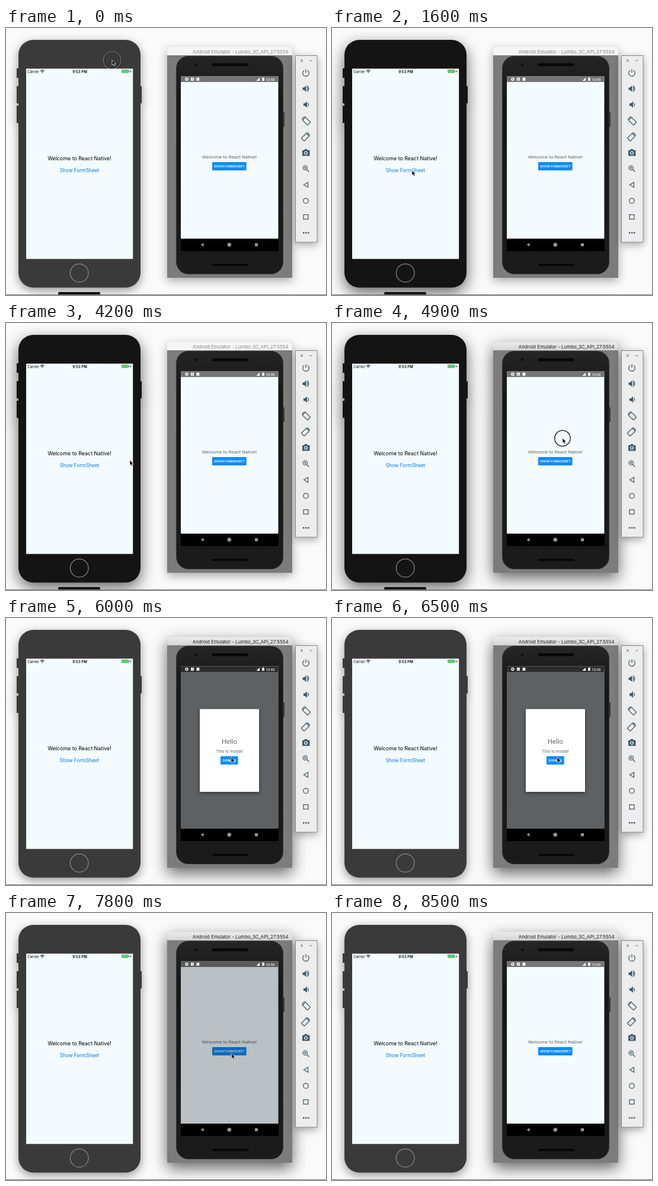
An HTML page for the animation above (8600 ms loop, 540 px wide and 450 px high).

```html
<!DOCTYPE html>
<html lang="en">
<head>
<meta charset="utf-8">
<title>Form sheet demo</title>
<style>
  html, body { margin: 0; width: 100%; height: 100%; overflow: hidden; background: #fafafa; }
  svg { display: block; width: 100%; height: 100%; }
  .ios { font-family: Inter, sans-serif; text-anchor: middle; }
  .link { font-size: 8.25px; fill: #0878e8; }
  .droid { font-family: Roboto, sans-serif; text-anchor: middle; fill: #666; }
  .cap { font-size: 5.8px; font-weight: 500; fill: #fff; }
  .button { fill: #0b8cf8; filter: drop-shadow(0 .8px .7px #0004); }
  #phone { fill: #3a3a3a; filter: drop-shadow(0 5px 8px #0006); }
  #phone.active { fill: #141414; filter: drop-shadow(0 9px 13px #0009); }
  #window { filter: drop-shadow(0 5px 8px #0005); }
  #window.active { filter: drop-shadow(0 9px 13px #0009); }
  #titleBar { fill: #f5f5f5; }
  #title { fill: #888; font: 7.9px Inter, sans-serif; text-anchor: end; }
  .active #titleBar { fill: url(#chrome); }
  .active #title { fill: #222; }
  .tools { fill: none; stroke: #3d5b6d; stroke-width: 1.25; }
  .tools .solid { fill: #3d5b6d; stroke: none; }
</style>
</head>
<body>
<svg viewBox="0 0 540 450">
  <defs>
    <clipPath id="iosScreen"><path d="M34 68.500H214.200V389.200H34z"/></clipPath>
    <linearGradient id="shell" x2="0" y2="1">
      <stop stop-color="#252525"/><stop offset=".2" stop-color="#171717"/><stop offset="1" stop-color="#1b1b1b"/>
    </linearGradient>
    <linearGradient id="chrome" x2="0" y2="1">
      <stop stop-color="#ebebeb"/><stop offset="1" stop-color="#d5d5d5"/>
    </linearGradient>
  </defs>
  <rect width="540" height="450" fill="#fafafa"/>

  <g id="phone">
    <rect x="21" y="20" width="206" height="417.500" rx="25"/>
    <path d="M18 68h4v16h-4zM18 98h4v29h-4zM18 131h4v29h-4zM226 98h3v29h-3z"/>
  </g>
  <circle cx="123.700" cy="413" r="15.300" fill="none" stroke="#8b8b8b" stroke-width="1.200"/>
  <g clip-path="url(#iosScreen)" class="ios">
    <rect x="34" y="68" width="181" height="322" fill="#f3fbff"/>
    <text x="124" y="223" font-size="8.900">Welcome to React Native!</text>
    <text x="124" y="243" class="link" id="iosOpen">Show FormSheet</text>
    <rect id="iosVeil" x="34" y="68" width="181" height="322" fill="#fff"/>
    <g id="iosSheet">
      <rect x="57" y="136.500" width="135" height="184.500" rx="3" fill="#fff" style="filter:drop-shadow(0 0 2px #0003)"/>
      <text x="124" y="214.500" font-size="12.400">Hello</text>
      <text x="124" y="231" font-size="8.300">This is modal!</text>
      <text x="124" y="250" class="link" id="iosDismiss">Dismiss</text>
    </g>
    <text x="46" y="75.500" font-size="5.950">Carrier</text>
    <text x="124.500" y="75.500" font-size="6.100" font-weight="600">9:53 PM</text>
    <path d="M58 72.300Q61.300 69.200 64.600 72.300M59.300 73.700Q61.300 71.800 63.300 73.700M60.600 75.100h1.400" fill="none" stroke="#111" stroke-width="1.100"/>
    <rect x="195.300" y="70.500" width="11.500" height="5" rx="1" fill="#4bd763" stroke="#777" stroke-width=".5"/>
    <path d="M207.400 72h.8v2h-.8zM211 70.500l-1.700 3h1.200l-.4 2.300 1.700-3h-1.200z" fill="#222"/>
  </g>
  <rect id="dock" x="88" y="445" width="71" height="9" rx="2" fill="#111"/>
  <path d="M0 449.500H540" stroke="#777"/>

  <g id="window">
    <path d="M272 421V36q0-4 4-4H479q4 0 4 4V421z" fill="#7c7c7c"/>
    <path id="titleBar" d="M272 46V36q0-4 4-4H479q4 0 4 4V46z"/>
    <text id="title" x="476.500" y="42.500">Android Emulator - Lumbo_3C_API_27:5554</text>
  </g>
  <rect x="468" y="142" width="2" height="25" rx="1" fill="#3a3a3a"/>
  <rect x="287.500" y="47.500" width="180" height="367" rx="20" fill="url(#shell)" stroke="#333"/>
  <g fill="#080808" stroke="#292929" stroke-width=".7">
    <rect x="347" y="59" width="62" height="6" rx="2.500"/>
    <rect x="347" y="396.500" width="63" height="5.500" rx="2.500"/>
    <circle cx="321" cy="62" r="2.500"/>
  </g>
  <path d="M295 81H460V376H295z"/>
  <g class="droid">
    <path d="M295 81.500H459.500V355H295z" fill="#f3fbff"/>
    <path d="M295 81.500H459.500V91H295z" fill="#757575"/>
    <text x="377" y="219.500" font-size="8.100">Welcome to React Native!</text>
    <rect class="button" x="348" y="226" width="57.500" height="14" rx=".8"/>
    <text class="cap" x="376.800" y="235.100">SHOW FORMSHEET</text>
    <path id="dim" d="M295 81.500H459.500V355H295z" fill="#000"/>
    <g id="droidSheet">
      <rect x="327" y="153.500" width="100" height="139.500" rx="1" fill="#fff" style="filter:drop-shadow(0 2px 3px #0007)"/>
      <text x="377" y="211.700" font-size="11.250">Hello</text>
      <text x="377" y="226.700" font-size="7.230">This is modal!</text>
      <rect class="button" x="362" y="233" width="29.500" height="14" rx=".8"/>
      <text class="cap" x="376.800" y="242.100">DISMISS</text>
    </g>
  </g>
  <g fill="#fff">
    <circle cx="305" cy="86.200" r="1.900" fill="none" stroke="#fff" stroke-width="1.500"/>
    <path d="M312 83.700h5v5h-5zM321.500 83.700h3.500l1.300 0v5h-4.800zM428 83.500v5.500h-5.500zM432.300 84h1v-.7h1.500v.7h1v5h-3.500z"/>
    <path d="M313.500 87.700l1-2.700 1 2.700M421.500 83.500l3 3" stroke="#666" fill="none" stroke-width=".7"/>
    <text x="438.300" y="88.600" font-family="Roboto, sans-serif" font-size="6" font-weight="500">12:53</text>
  </g>
  <g fill="#999">
    <path d="M333.500 362.300v6l-5-3z"/><circle cx="376.800" cy="365.300" r="3.300" stroke="#555"/><path d="M420 362.800h5v5h-5z"/>
  </g>

  <rect x="488.500" y="46.500" width="36.500" height="314.500" fill="#ededed" stroke="#858585" style="filter:drop-shadow(0 4px 7px #0005)"/>
  <path d="M497 53l4 4m0-4l-4 4M512 55h4.500" stroke="#666" stroke-width=".9"/>
  <g class="tools">
    <path d="M503.200 71.500a5.300 5.300 0 1 0 5.600 0M506 69.500v6"/>
    <path class="solid" d="M500.500 100.200h2.500l3.500-3.400v11l-3.500-3.400h-2.500z"/>
    <path d="M508 99.500q2.500 2.800 0 5.500M508.300 97q5.300 5.300 0 10.500"/>
    <path class="solid" d="M502 127h2.500l3.500-3.400v11l-3.500-3.400h-2.500z"/>
    <path d="M509.300 126.500q2.400 2.700 0 5.400"/>
    <g id="rotate">
      <rect x="501" y="153.500" width="12" height="7" rx="1" transform="rotate(45 507 157)"/>
      <path d="M499.800 155q.3-5 5.700-5.500"/>
    </g>
    <use href="#rotate" transform="translate(1012 27) scale(-1 1)"/>
    <path class="solid" fill-rule="evenodd" d="M500 206h3l1.500-2h3l1.500 2h3.500v9.500H500zM506 207.400a3.100 3.100 0 1 0 .1 0z"/>
    <circle class="solid" cx="506" cy="210.500" r="1.700"/>
    <circle cx="504.800" cy="235.700" r="3.700"/><path d="M507.500 238.500l4 4M503 235.700h3.600M504.800 233.900v3.600"/>
    <path d="M509.500 260v8.500l-7-4.200z"/>
    <circle cx="506" cy="291.300" r="4.300"/>
    <path d="M502 314.500h8v7.500h-8z"/>
    <path class="solid" d="M501 344h2.400v2.400H501zM505 344h2.400v2.400H505zM509 344h2.400v2.400H509z"/>
  </g>

  <g id="pointer">
    <g id="ring" fill="none">
      <circle cy=".4" r="13.700" stroke="#fff" stroke-opacity=".55" stroke-width="2"/>
      <circle cy=".4" r="13.200" stroke="#111" stroke-width="1.300"/>
    </g>
    <path d="M0 0V8.500l2-1.800 1.500 3.300 1.600-.7-1.500-3.200h2.700z" fill="#000" stroke="#fff" stroke-width=".7"/>
  </g>
</svg>
<script>
const LOOP = 8600, STEP = 100;
const $ = id => document.getElementById(id);
const clamp = v => Math.max(0, Math.min(1, v));
const ease = v => v * v * (3 - 2 * v);
const ramp = (t, from, to) => ease(clamp((t - from) / (to - from)));
const between = (t, from, to) => t >= from && t < to;
const fade = (id, value) => $(id).setAttribute('opacity', value);
const move = (id, x, y) => $(id).setAttribute('transform', `translate(${x} ${y})`);

// Pointer stops: time, x, y
const stops = [
  [0, 179, 54], [500, 179, 54], [1300, 135, 240], [2100, 135, 240], [2800, 125.5, 248.5],
  [3900, 125.5, 248.5], [4700, 389, 194], [5000, 389, 194], [5500, 380, 235],
  [7000, 380, 235], [7700, 380.5, 237], [LOOP, 380.5, 237]
];
const clicks = [0, 1700, 3400, 4900, 5700, 7600];

function pointerAt(t) {
  const i = stops.findIndex(s => s[0] > t);
  const [t0, x0, y0] = stops[i - 1], [t1, x1, y1] = stops[i];
  const k = ramp(t, t0, t1);
  return [x0 + (x1 - x0) * k, y0 + (y1 - y0) * k];
}

function draw(t) {
  $('phone').classList.toggle('active', between(t, 200, 5000));
  $('window').classList.toggle('active', t >= 4800);
  fade('dock', t < 5000 ? 1 : 0);

  const iosShown = ramp(t, 1800, 2300) - ramp(t, 3400, 3900);
  move('iosSheet', 0, (1 - iosShown) * 260);
  fade('iosVeil', iosShown * .5);
  fade('iosOpen', between(t, 1700, 1900) ? .2 : 1);
  fade('iosDismiss', between(t, 3200, 3500) ? .2 : 1);

  fade('dim', .61 * (ramp(t, 5700, 6000) - ramp(t, 7650, 7910)));
  fade('droidSheet', ramp(t, 5700, 5950) - ramp(t, 7600, 7800));

  move('pointer', ...pointerAt(t));
  fade('pointer', t < 8300 ? 1 : 0);
  fade('ring', clicks.some(c => between(t, c, c + 200)) ? 1 : 0);
}

function tick(now) {
  draw(Math.floor(now % LOOP / STEP) * STEP);
  requestAnimationFrame(tick);
}
tick(performance.now());
</script>
</body>
</html>
```
